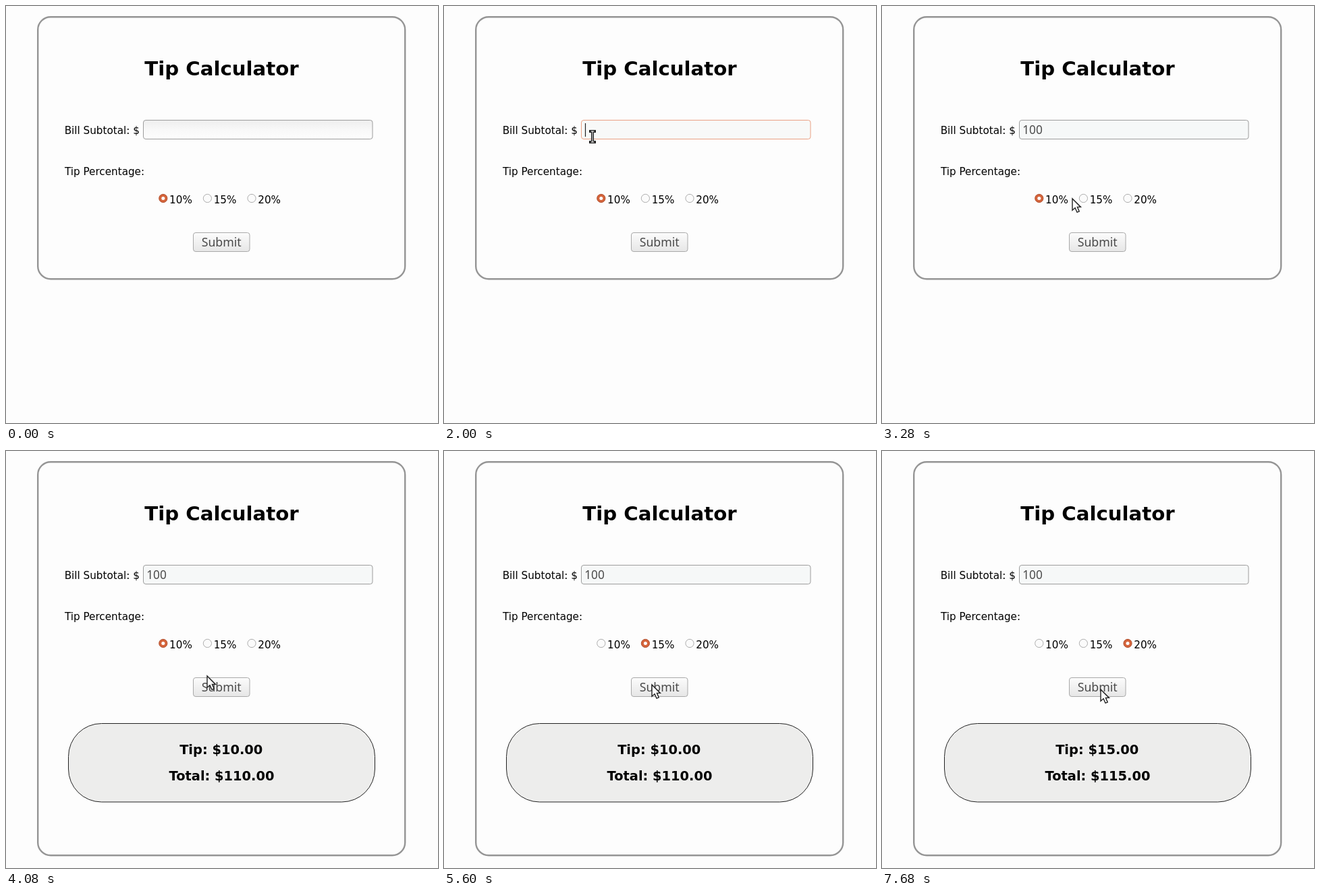
Write an HTML page that moves like this. It is 640 px wide and 619 px high and loops after 8 s.

```html
<!DOCTYPE html>
<html lang="en">
<head>
<meta charset="utf-8">
<title>Tip Calculator</title>
<style>
  html, body { margin: 0; width: 100%; height: 100%; overflow: hidden; background: #fdfdfd; }
  svg { display: block; width: 100%; height: 100%; }
  text { font-family: "DejaVu Sans", sans-serif; font-size: 15.2px; fill: #000; }
  .bold { font-weight: bold; font-size: 19.4px; text-anchor: middle; }
  .title { font-size: 29.2px; }
  .ui { font-family: "Noto Sans", "Open Sans", sans-serif; font-size: 17.3px; fill: #4a4a4a; }
</style>
</head>
<body>
<svg viewBox="0 0 640 619" preserveAspectRatio="none">
  <defs>
    <linearGradient id="inset" x2="0" y2="1">
      <stop offset="0" stop-color="#eeeeee"/>
      <stop offset=".5" stop-color="#f8f8f8"/>
      <stop offset="1" stop-color="#fdfdfd"/>
    </linearGradient>
    <linearGradient id="raised" x2="0" y2="1">
      <stop offset="0" stop-color="#fcfcfc"/>
      <stop offset="1" stop-color="#e6e6e6"/>
    </linearGradient>
  </defs>
  <rect width="640" height="619" fill="#fdfdfd"/>
  <rect id="card" x="47.2" y="16.2" width="544" height="389" rx="19" fill="none" stroke="#959595" stroke-width="2.4"/>

  <text class="bold title" x="319.5" y="103">Tip Calculator</text>
  <text x="86.7" y="190">Bill Subtotal: $</text>
  <rect id="field" x="203.5" y="169.5" width="339.5" height="28" rx="3.5"/>
  <text id="amount" class="ui" x="208.2" y="190"></text>
  <path id="caret" d="M209.5 174V194" stroke="#222" stroke-width="1.2"/>

  <text x="87" y="251.3">Tip Percentage:</text>
  <g id="radios"></g>

  <rect x="277.5" y="336.5" width="83.5" height="28" rx="3.5" fill="url(#raised)" stroke="#a9a9a9"/>
  <text class="ui" x="319.2" y="357" text-anchor="middle" style="font-size:17.7px">Submit</text>

  <g id="result">
    <rect x="92.5" y="404.5" width="454" height="116.5" rx="49" fill="#ededec" stroke="#222"/>
    <text id="tip" class="bold" x="318.7" y="449.6"></text>
    <text id="total" class="bold" x="319.5" y="488.6"></text>
  </g>

  <path id="arrow" d="M0 0V17.3L4.1 13.6L7 20.2L10.2 18.8L7.4 12.4H12.4Z" fill="#fff" stroke="#222" stroke-width="1.4"/>
  <g id="beam" fill="none" stroke-linecap="square">
    <path d="M-3 -8H3M0 -8V8M-3 8H3" stroke="#222" stroke-width="4"/>
    <path d="M-2 -8H2M0 -8V8M-2 8H2" stroke="#fff" stroke-width="1"/>
  </g>
</svg>
<script>
const LOOP = 8000, STEP = 80;
const $ = id => document.getElementById(id);
const show = (id, on) => $(id).setAttribute("display", on ? "inline" : "none");

const radios = ["10%", "15%", "20%"].map((label, i) => {
  const x = 232.8 + i * 65.6;
  $("radios").insertAdjacentHTML("beforeend",
    `<circle cx="${x}" cy="285.5" r="6.1"/><circle cx="${x}" cy="285.5" r="2.5" fill="#fff"/>` +
    `<text x="${x + 9.3}" y="292.5">${label}</text>`);
  const [ring, dot] = [...$("radios").querySelectorAll("circle")].slice(-2);
  return { ring, dot };
});

// Pointer keys: time, x, y
const path = [
  [80, 560, 20], [320, 420, 110], [560, 360, 270], [880, 95, 245],
  [1120, 165, 222], [1360, 220, 194], [2640, 220, 194],
  [2960, 234, 284], [3120, 234, 284], [3280, 282, 286], [3600, 298, 334],
  [4720, 298, 334], [5040, 299, 284], [5280, 299, 284], [5600, 308, 347],
  [6640, 308, 347], [7040, 363, 284], [7360, 363, 284],
  [7520, 347, 285], [7680, 324, 354], [LOOP, 324, 354]
];

// Events: time, value
const typed = [[0, ""], [2160, "1"], [2400, "10"], [2560, "100"]];
const chosen = [[0, 0], [5120, 1], [7120, 2]];
const submitted = [[0, 0], [3920, 10], [5840, 15]];
const focus = [1840, 3000];

const latest = (events, t) => events.filter(e => e[0] <= t).pop()[1];

function pointer(t) {
  const i = path.findIndex(p => p[0] > t);
  if (i < 1) return null;
  const [t0, x0, y0] = path[i - 1], [t1, x1, y1] = path[i];
  const k = (t - t0) / (t1 - t0), e = k * k * (3 - 2 * k);
  return [x0 + (x1 - x0) * e, y0 + (y1 - y0) * e];
}

function render(t) {
  const focused = t >= focus[0] && t < focus[1];
  const text = latest(typed, t);
  $("amount").textContent = text;
  $("field").setAttribute("fill", focused ? "#f8f9f8" : text ? "#f6f8f8" : "url(#inset)");
  $("field").setAttribute("stroke", focused ? "#eaa184" : "#9d9d9d");
  show("caret", focused);
  $("caret").setAttribute("transform", `translate(${text.length * 9.9} 0)`);

  radios.forEach(({ ring, dot }, i) => {
    const on = i === latest(chosen, t);
    ring.setAttribute("fill", on ? "#d5643b" : "#fbfbfb");
    ring.setAttribute("stroke", on ? "#b04e2d" : "#adadad");
    dot.setAttribute("display", on ? "inline" : "none");
  });

  const tip = latest(submitted, t);
  show("result", tip > 0);
  $("card").setAttribute("height", tip ? 584 : 389);
  $("tip").textContent = `Tip: $${tip.toFixed(2)}`;
  $("total").textContent = `Total: $${(100 + tip).toFixed(2)}`;

  const p = pointer(t);
  const inField = p && p[0] > 203 && p[0] < 543 && p[1] > 169 && p[1] < 198;
  show("arrow", p && !inField);
  show("beam", inField);
  if (p) $(inField ? "beam" : "arrow").setAttribute("transform", `translate(${p[0]} ${p[1]})`);
}

const start = performance.now();
function tick() {
  const t = (performance.now() - start) % LOOP;
  render(Math.floor(t / STEP) * STEP);
  requestAnimationFrame(tick);
}
tick();
</script>
</body>
</html>
```
